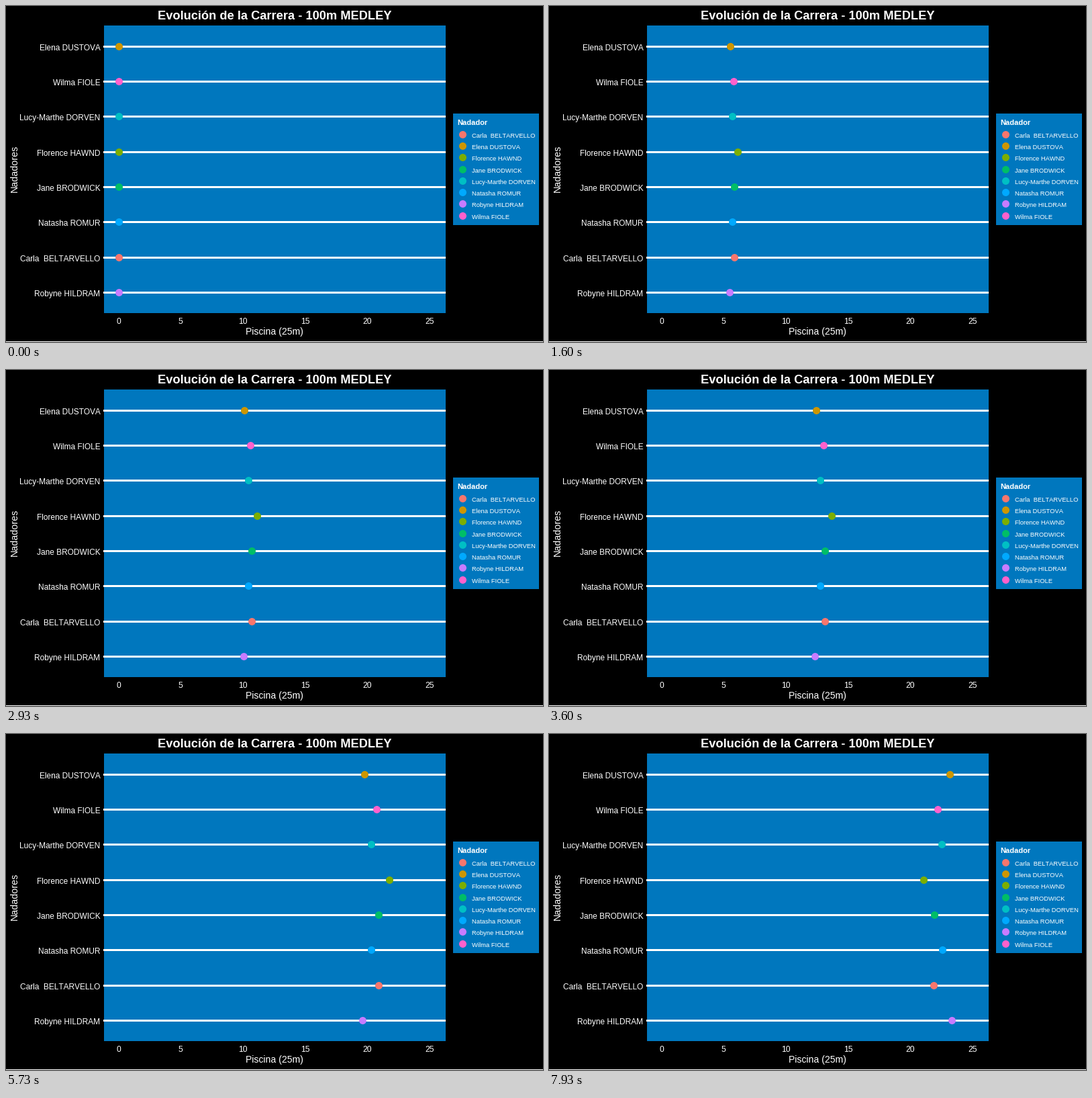
Animation, 800 px wide and 500 px high, one loop 8 s. Source, as a matplotlib script:

```python
import math

import matplotlib.pyplot as plt
from matplotlib.animation import FuncAnimation
from matplotlib.patches import Circle, Rectangle

W, H, DPI = 800, 500, 100
TICKS, TICK_MS = 400, 20
WATER = "#0077BE"
START_X, POOL = 168.5, 464      # start wall and pool length in pixels
RADIUS = 5.5

plt.rcParams["font.family"] = "Liberation Sans"
plt.rcParams["text.kerning_factor"] = 6

# name, colour, lane from the top, step of the turn, return speed (px per step)
SWIMMERS = [
    ("Carla  BELTARVELLO", "#F8766D", 6, 103, 3.69),
    ("Elena DUSTOVA", "#CD9600", 0, 109, 3.5),
    ("Florence HAWND", "#7CAE00", 3, 98.9, 3.67),
    ("Jane BRODWICK", "#00BE67", 4, 103, 3.62),
    ("Lucy-Marthe DORVEN", "#00BFC4", 2, 106, 3.61),
    ("Natasha ROMUR", "#00A9FF", 5, 106, 3.54),
    ("Robyne HILDRAM", "#C77CFF", 7, 110.05, 3.56),
    ("Wilma FIOLE", "#FF61CC", 1, 104, 3.53),
]

fig = plt.figure(figsize=(W / DPI, H / DPI), dpi=DPI, facecolor="black")
ax = fig.add_axes([0, 0, 1, 1])
ax.set_xlim(0, W)
ax.set_ylim(H, 0)
ax.axis("off")


def box(x0, y0, x1, y1, color, z=1):
    ax.add_patch(Rectangle((x0, y0), x1 - x0, y1 - y0, facecolor=color,
                           linewidth=0, antialiased=False, zorder=z))


def dot(x, y, color):
    return ax.add_patch(Circle((x, y), RADIUS, facecolor=color, linewidth=0,
                               zorder=4))


def label(x, y, text, px, ha="center", **style):
    ax.text(x, y, text, fontsize=px * 72 / DPI, color="white", ha=ha,
            va="baseline", zorder=5, **style)


def lane_y(lane):
    return math.floor(60.3 + 52.286 * lane) + 0.5


def swim_x(step, turn, back):
    if step <= turn:
        done = POOL * step / turn
    else:
        done = POOL - back * (step - turn)
    return START_X + round(done)


# pool
box(146, 29, 655, 457, WATER)
dots = []
for name, color, lane, turn, back in SWIMMERS:
    y = lane_y(lane)
    box(145, y - 1.5, 655, y + 1.5, "white", 2)
    label(140.5, y + 5.5, name, 11.85, ha="right")
    dots.append(dot(START_X, y, color))

# titles, axis and bottom edge
label(400, 20, "Evolución de la Carrera - 100m MEDLEY", 18.25, weight="bold")
label(400, 489, "Piscina (25m)", 14)
label(17, 241.5, "Nadadores", 14.2, rotation=90, rotation_mode="anchor")
for metres in range(0, 30, 5):
    label(167.4 + POOL * metres / 25, 473, str(metres), 12)
box(0, 499, W, H, "white")

# legend
box(666, 160, 794, 326, WATER)
label(672, 177, "Nadador", 11, ha="left", weight="bold")
for row, (name, color, *_) in enumerate(SWIMMERS):
    y = math.floor(191.3 + 17.28 * row) + 0.5
    dot(680.5, y, color)
    label(694.5, y + 4.5, name, 9.4, ha="left")


def draw(tick):
    step = (3 * tick + 2) // 10     # 15 steps a second
    for mark, (_, _, lane, turn, back) in zip(dots, SWIMMERS):
        mark.center = (swim_x(step, turn, back), lane_y(lane))
    return dots


anim = FuncAnimation(fig, draw, frames=TICKS, interval=TICK_MS,
                     repeat=True, repeat_delay=0, blit=False)
plt.show()
```
